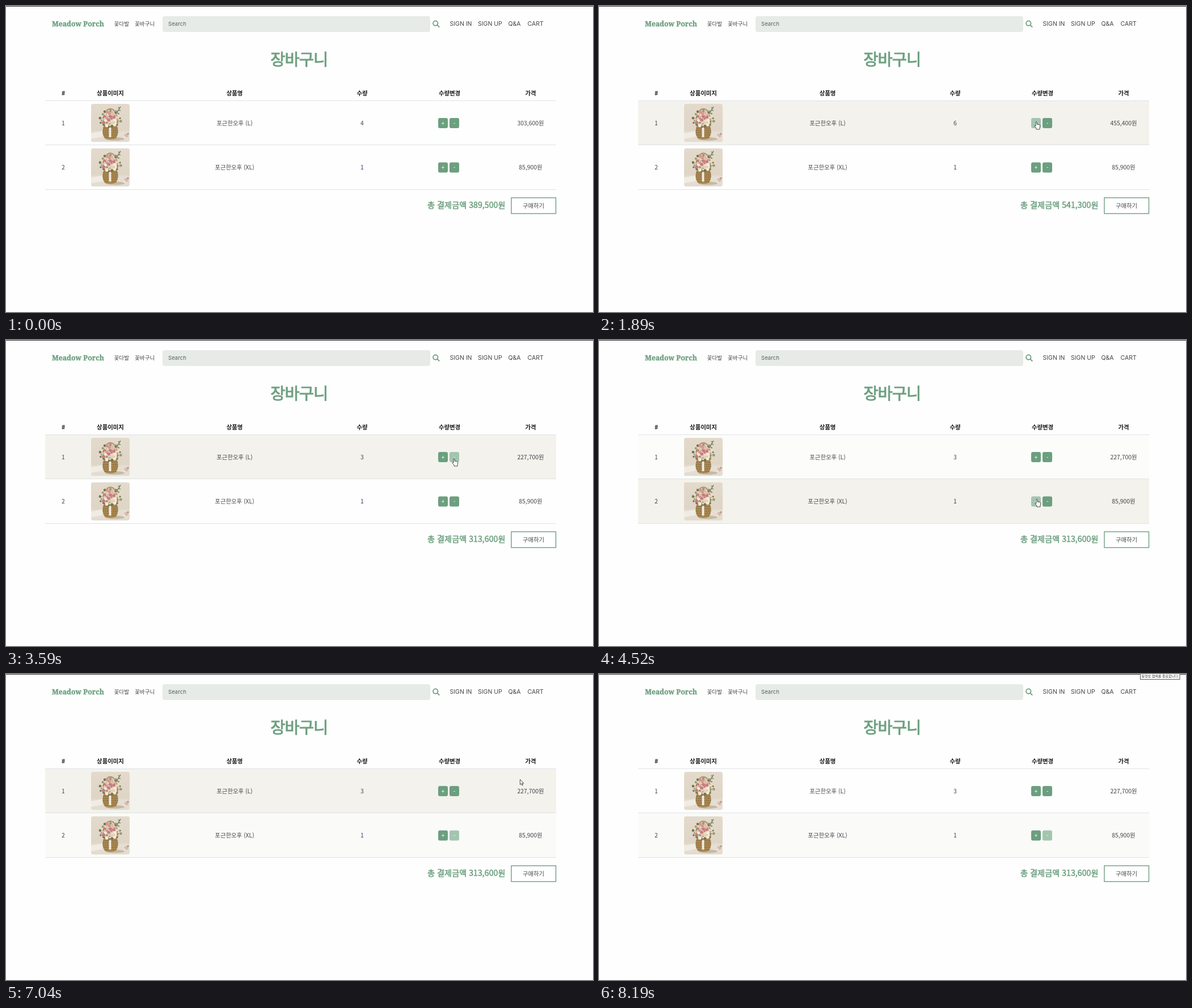
These frames come from a looping animation (1035 by 541 pixels, 8.29 s). An HTML page:

```html
<!DOCTYPE html>
<html lang="ko">
<head>
<meta charset="utf-8">
<title>장바구니</title>
<style>
  html, body { margin: 0; width: 100%; height: 100%; overflow: hidden; background: #fefefe; }
  svg { display: block; width: 1035px; height: 541px; }
  text { font: 10.4px "Noto Sans CJK KR", "Noto Sans", sans-serif; fill: #40454a; }
  .mid { text-anchor: middle; }
  .head text { font-weight: 700; fill: #17191c; }
  .nav text { font-size: 9.6px; }
  .nav .latin { font: 10.5px Inter, sans-serif; }
  .nav .hint { font: 9.6px Inter, sans-serif; fill: #59615c; }
  .nav .brand { font: 900 12.3px "Noto Serif", serif; fill: #6c9f7f; stroke: #6c9f7f; stroke-width: .4; }
  .title { font-size: 28.5px; letter-spacing: -1px; fill: #6c9f7f; stroke: #6c9f7f; stroke-width: .9; }
  .total { font-size: 14.2px; fill: #6c9f7f; stroke: #6c9f7f; stroke-width: .5; }
  .btn rect { fill: #6c9f7f; }
  .btn.on rect { fill: #a3c5b0; }
  .btn text { fill: #fff; }
  .line { stroke: #dee2e6; }
  .cursor path { fill: #fff; stroke: #222; stroke-width: .8; stroke-linejoin: round; }
  .tip text { font-size: 6px; fill: #333; }
</style>
</head>
<body>
<svg viewBox="0 0 1035 541">
  <defs>
    <linearGradient id="wall" x2="0" y2="1">
      <stop offset="0" stop-color="#e3dacc"/>
      <stop offset=".68" stop-color="#ded5c6"/>
      <stop offset=".76" stop-color="#e6dfd4"/>
      <stop offset="1" stop-color="#e2dbd0"/>
    </linearGradient>
    <clipPath id="frame"><rect width="68" height="67.5" rx="4"/></clipPath>
    <g id="photo" clip-path="url(#frame)">
      <rect width="68" height="67.5" fill="url(#wall)"/>
      <path d="M0 52L20 48V58L0 62Z" fill="#f1ece3"/>
      <ellipse cx="42" cy="62" rx="17" ry="3" fill="#c6b9a4"/>
      <path d="M22 38C18 -1 50 -1 46 38" fill="none" stroke="#a98f64" stroke-width="1.8"/>
      <path d="M42 21L52 5M46 14l-3-2M48 11l4 1M45 16l4 1M50 8l-2-2" fill="none" stroke="#7a8468" stroke-width="1.6"/>
      <path d="M23 37H45Q51 50 44 61Q34 65 24 61Q17 50 23 37Z" fill="#a98852"/>
      <path d="M22 43H47M21 47H47M21 51H47M22 55H46M24 59H45" stroke="#83683d" stroke-width="1.3" stroke-dasharray="2 1.5"/>
      <g id="leaves"></g>
      <g id="blooms"></g>
      <path d="M31.5 42h4v17h-4z" fill="#f0eadf"/>
      <circle cx="62" cy="56" r="3.5" fill="#d9bab0"/>
      <circle cx="59" cy="59" r="2" fill="#efe2d8"/>
      <circle cx="65" cy="53" r="1.7" fill="#b99488"/>
    </g>
  </defs>

  <rect width="1035" height="1" fill="#333"/>

  <g class="nav">
    <text class="brand" x="81" y="35.5">Meadow Porch</text>
    <text x="190.5" y="34.5">꽃다발</text>
    <text x="227" y="34.5">꽃바구니</text>
    <rect x="276" y="18" width="472" height="28" rx="4" fill="#e6ebe7"/>
    <text class="hint" x="286" y="34.7">Search</text>
    <g fill="none" stroke="#6c9f7f" stroke-width="1.8">
      <circle cx="757.3" cy="30.6" r="4.2"/>
      <path d="M760.4 33.7L764.2 37.5"/>
    </g>
    <text class="latin" x="782.5" y="35.2">SIGN IN</text>
    <text class="latin" x="832" y="35.2">SIGN UP</text>
    <text class="latin" x="885.5" y="35.2">Q&amp;A</text>
    <text class="latin" x="919.5" y="35.2">CART</text>
  </g>

  <text class="title mid" x="516.7" y="104.7">장바구니</text>

  <g class="head mid">
    <text x="101" y="158.3">#</text>
    <text x="184" y="158.3">상품이미지</text>
    <text x="403" y="158.3">상품명</text>
    <text x="628" y="158.3">수량</text>
    <text x="782" y="158.3">수량변경</text>
    <text x="925" y="158.3">가격</text>
  </g>

  <g id="rows"></g>
  <path class="line" d="M69 167.5H970M69 245.5H970M69 324.5H970"/>

  <text class="total" id="total" x="880.5" y="357" text-anchor="end"></text>
  <rect x="891" y="339" width="78.5" height="28" fill="#fff" stroke="#6c9f7f" stroke-width="1.4"/>
  <text class="mid" x="930" y="356.5">구매하기</text>

  <g class="cursor" id="cursor">
    <path id="arrow" d="M.4 .4V9.6L2.5 7.7 4 11 5.4 10.4 4 7.2H6.8Z"/>
    <path id="hand" d="M-1 1.2Q0-.6 1 1.2V5L5.5 5.8Q7 6.2 6.8 8L6 11.5V14H0V12L-3 8.3Q-3.2 6.6-1 8Z"/>
  </g>

  <g class="tip" id="tip">
    <rect x="954.5" y="-1" width="69.5" height="10.5" fill="#fff" stroke="#555"/>
    <text class="mid" x="989.3" y="5.8">동영상 캡쳐를 종료합니다.</text>
  </g>
</svg>

<script>
const LOOP = 8290, STEP = 103, ROW_Y = 167.5, ROW_H = 78.5;
const PLUS = 762, MINUS = 782;
const $ = id => document.getElementById(id);

const items = [
  { name: "포근한오후 (L)", price: 75900, count: 4, add: [1460, 1890], cut: [2720, 3160, 3590] },
  { name: "포근한오후 (XL)", price: 85900, count: 1, add: [4620, 5050], cut: [5660, 5980] }
];

// Each leg: start time, end time, destination.
const entry = [865, 54];
const legs = [
  [310, 1130, 771, 204],
  [2210, 2620, 789.5, 209],
  [3800, 4620, 771, 284],
  [5150, 5560, 795, 287],
  [6190, 7040, 906, 186],
  [7140, 7140, 917, 125],
  [7240, 7770, 958, 1]
];

function drawBouquet() {
  const colors = ["#dc9490", "#f0dac6", "#e6b9a6", "#f5eadb", "#c97a7c", "#ecd0ae"];
  let seed = 11;
  const rand = () => (seed = seed * 16807 % 2147483647) / 2147483647;
  // Sunflower spacing keeps the heads evenly spread over an oval.
  const blob = (i, n, r, fill, spread) => {
    const a = i * 2.4, d = Math.sqrt((i + .5) / n) * spread;
    const x = 34 + Math.cos(a) * d * 1.25, y = 26.5 + Math.sin(a) * d;
    return `<circle cx="${x}" cy="${y}" r="${r}" fill="${fill}"/>`;
  };
  let leaves = "", blooms = "";
  for (let i = 0; i < 44; i++) leaves += blob(i, 44, 1.4 + rand(), i % 3 ? "#6d7650" : "#959a74", 15.5);
  for (let i = 0; i < 30; i++) blooms += blob(i, 30, 1.4 + rand() * 1.5, colors[Math.floor(rand() * 6)], 13.5);
  $("leaves").innerHTML = leaves;
  $("blooms").innerHTML = blooms;
}

const button = (x, sign) => `<g class="btn">
  <rect x="${x}" y="30.5" width="17" height="18" rx="3"/>
  <text class="mid" x="${x + 8.5}" y="43.3">${sign}</text></g>`;

function buildRow(item, i) {
  $("rows").insertAdjacentHTML("beforeend", `<g transform="translate(0 ${ROW_Y + i * ROW_H})">
    <rect class="bg" x="69" width="901" height="${ROW_H}"/>
    <use href="#photo" x="150" y="5.5"/>
    <g class="mid">
      <text x="101" y="43.3">${i + 1}</text>
      <text x="403" y="43.3">${item.name}</text>
      <text class="qty" x="628" y="43.3"></text>
      <text class="sum" x="925" y="43.3"></text>
    </g>
    ${button(PLUS, "+")}${button(MINUS, "-")}</g>`);
  const row = $("rows").lastElementChild;
  for (const key of ["bg", "qty", "sum"]) item[key] = row.querySelector("." + key);
  item.buttons = row.querySelectorAll(".btn");
}

function pointer(t) {
  let [x, y] = entry;
  for (const [start, end, toX, toY] of legs) {
    if (t < start) break;
    const n = Math.round((end - start) / STEP);
    const i = n ? Math.min(n, Math.floor((t - start) / (end - start) * n + .001)) : 0;
    const k = (i + 1) / (n + 1);
    const e = start > 7200 ? 1 - (1 - k) ** 2 : k * k * (3 - 2 * k);
    x += (toX - x) * e;
    y += (toY - y) * e;
  }
  return { x, y, shown: t >= 310 && t < 7870 };
}

const passed = (times, t) => times.filter(at => t >= at).length;
const won = n => n.toLocaleString("en-US") + "원";
const show = (el, on) => el.style.display = on ? "" : "none";

function render(t) {
  const p = pointer(t);
  let total = 0, overButton = false;
  items.forEach((item, i) => {
    const top = ROW_Y + i * ROW_H, dy = p.y - top;
    const hover = p.shown && dy >= 0 && dy < ROW_H;
    const rest = i ? (t > 6000 ? "#fafaf8" : "none") : (t > 4000 && t < 7100 ? "#fcfcfa" : "none");
    item.bg.setAttribute("fill", hover ? "#f3f2ec" : rest);

    [PLUS, MINUS].forEach((x, b) => {
      const over = hover && dy > 30 && dy < 49 && p.x >= x && p.x < x + 18;
      const focused = i === 1 && b === 1 && t >= 5560;
      item.buttons[b].classList.toggle("on", over || focused);
      overButton ||= over;
    });

    const n = item.count + passed(item.add, t) - passed(item.cut, t);
    item.qty.textContent = n;
    item.qty.style.fill = n === 1 ? "#34347a" : "";
    item.sum.textContent = won(n * item.price);
    total += n * item.price;
  });
  $("total").textContent = "총 결제금액 " + won(total);
  $("cursor").setAttribute("transform", `translate(${Math.round(p.x)} ${Math.round(p.y)})`);
  show($("cursor"), p.shown);
  show($("arrow"), !overButton);
  show($("hand"), overButton);
  show($("tip"), t >= 8190);
}

drawBouquet();
items.forEach(buildRow);
const begin = performance.now();
(function tick() {
  render((performance.now() - begin) % LOOP);
  requestAnimationFrame(tick);
})();
</script>
</body>
</html>
```
